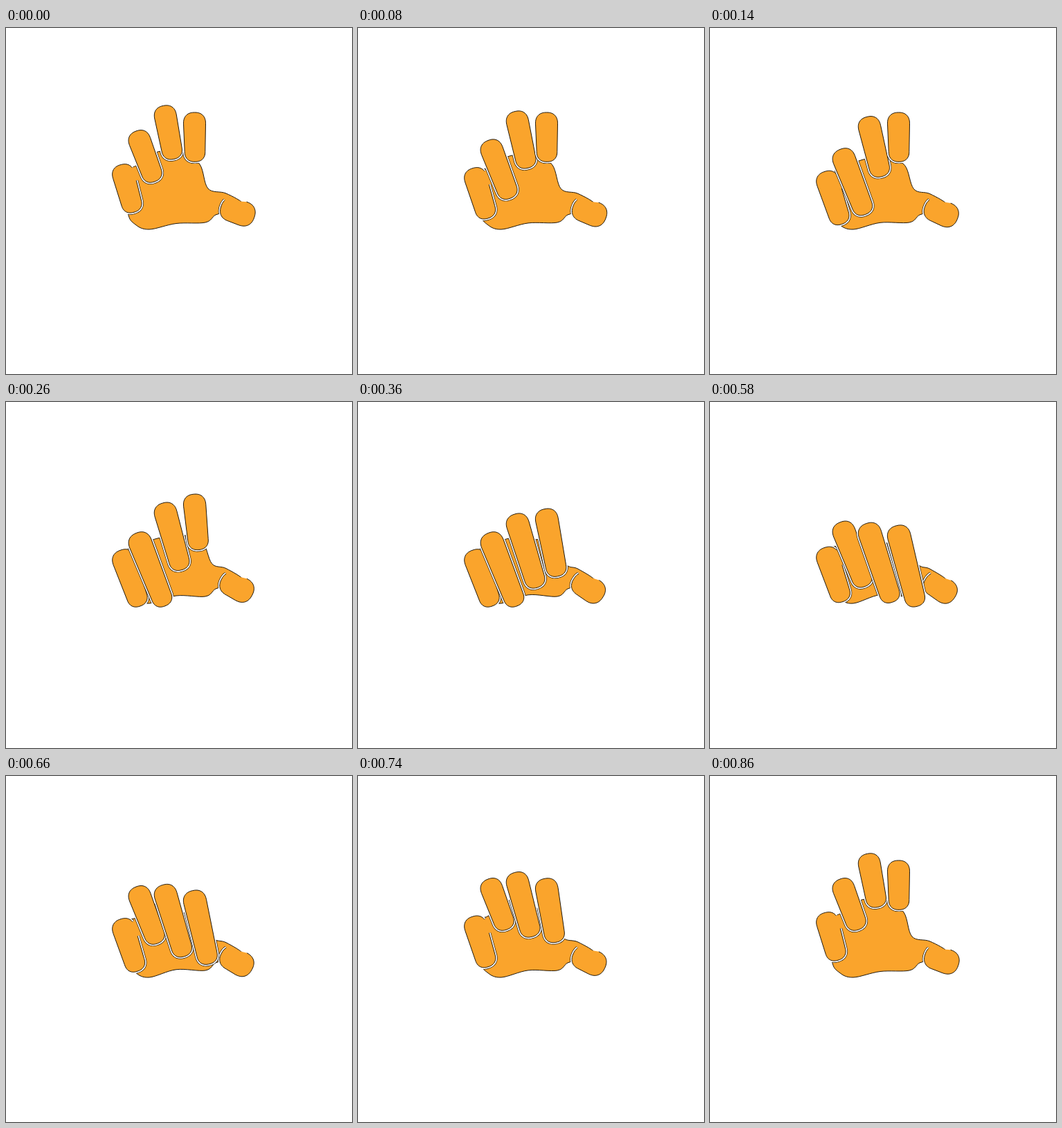
An HTML page with a canvas that plays this animation: 500 by 500 pixels, repeating every 0.88 s.

```html
<!DOCTYPE html>
<html lang="en">
<head>
<meta charset="utf-8">
<title>Drumming fingers</title>
<style>
  html, body { margin: 0; width: 100%; height: 100%; overflow: hidden; background: #fff; }
  canvas { display: block; width: 500px; height: 500px; }
</style>
</head>
<body>
<canvas id="stage" width="500" height="500"></canvas>
<script>
const ctx = document.getElementById('stage').getContext('2d');
const LOOP = 880, STEP = 20, OPEN_END = 860;
const ORANGE = '#faa42c', LINE = '#20180c';

const lerp = (a, b, p) => a + (b - a) * p;
const ramp = (t, from, to) => Math.min(1, Math.max(0, (t - from) / (to - from)));

// Curls in with a slight ease, then straightens at constant speed
const curl = (t, close, closeEnd, open, openEnd = OPEN_END) =>
  ramp(t, close, closeEnd) ** 1.2 - ramp(t, open, openEnd);

// Superelliptic half cap, a little squarer than a circle
function cap(path, x, y, r, axis, from, to) {
  const squash = v => Math.sign(v) * Math.abs(v) ** 0.85;
  const ca = Math.cos(axis), sa = Math.sin(axis), steps = 24;
  for (let i = 0; i <= steps; i++) {
    const a = lerp(from, to, i / steps);
    const u = r * squash(Math.cos(a)), v = r * squash(Math.sin(a));
    path.lineTo(x + u * ca - v * sa, y + u * sa + v * ca);
  }
}

// Tapered capsule; with a cut, one side stays open and blends into the palm
function digit(x0, y0, r0, x1, y1, r1, { start = 0, cut = 0 } = {}) {
  const path = new Path2D(), axis = Math.atan2(y1 - y0, x1 - x0), q = Math.PI / 2;
  const r = lerp(r0, r1, start);
  path.moveTo(lerp(x0, x1, start) + r * Math.sin(axis), lerp(y0, y1, start) - r * Math.cos(axis));
  cap(path, x1, y1, r1, axis, -q, q);
  cap(path, x0, y0, r0, axis, q, 3 * q - cut);
  if (!cut) path.closePath();
  return path;
}

// Closed Catmull-Rom curve
function blob(points) {
  const n = points.length, path = new Path2D(), at = i => points[(i + n) % n];
  path.moveTo(...at(0));
  for (let i = 0; i < n; i++) {
    const [a, b, c, d] = [at(i - 1), at(i), at(i + 1), at(i + 2)];
    path.bezierCurveTo(
      b[0] + (c[0] - a[0]) / 6, b[1] + (c[1] - a[1]) / 6,
      c[0] - (d[0] - b[0]) / 6, c[1] - (d[1] - b[1]) / 6, ...c);
  }
  return path;
}

function stroke(path, color, width) {
  ctx.strokeStyle = color;
  ctx.lineWidth = width;
  ctx.stroke(path);
}

// The white gap is cut only into what is already painted
function paint(path) {
  ctx.globalCompositeOperation = 'source-atop';
  stroke(path, LINE, 5.6);
  stroke(path, '#fff', 4.2);
  ctx.globalCompositeOperation = 'source-over';
  ctx.fillStyle = ORANGE;
  ctx.fill(path);
  stroke(path, LINE, 1);
}

function palm(pinky, ring, middle, thumb) {
  return blob([
    [176, 266], [187, 284], [207, 291], [246, 282.5 - 5 * thumb], [288, 281], [303, 270],
    [320, 266], [343, 255 + 5 * thumb], [318, 239 + 3 * thumb],
    [292 + 11 * thumb, 232 + 3 * thumb], [280 + 6 * thumb, 197 + 6 * thumb],
    [255, 180 + 25 * middle], [219, 179 + 18 * ring],
    [188, 199 + 10 * pinky], [174, 207 + 10 * pinky]
  ]);
}

// Closed fingertips line up in an evenly spaced row
function finger(slot, p, topX, topY, topDrop, tipX, tipY, blend) {
  return digit(topX + p, topY + topDrop * p, 16 + 0.8 * p,
    lerp(tipX, 189 + 35.5 * slot, p), lerp(tipY, 281, p), 14.8, blend);
}

function draw(t) {
  const pinky = curl(t, 0, 214, 500), ring = curl(t, 0, 200, 488, 725);
  const middle = curl(t, 0, 460, 564), index = curl(t, 190, 460, 600);
  const thumb = curl(t, 0, 460, 500);

  ctx.clearRect(0, 0, 500, 500);
  ctx.lineJoin = 'round';
  paint(palm(pinky, ring, middle, thumb));
  paint(digit(327 - thumb, 263 + 2 * thumb, 17, 342 - 4 * thumb, 268 + 6 * thumb, 17.7,
    { start: 1, cut: 1 }));
  paint(finger(0, pinky, 170, 213, 17, 181, 252, { start: 0.3, cut: 0.4 }));
  paint(finger(1, ring, 193.5, 164, 41, 210, 208));
  paint(finger(2, middle, 230.5, 128, 67, 239.5, 175));
  paint(finger(3, index, 272.5, 138, 57, 273, 178.5));
}

const start = performance.now();
function tick() {
  const t = (performance.now() - start) % LOOP;
  draw(Math.floor(t / STEP) * STEP);
  requestAnimationFrame(tick);
}
tick();
</script>
</body>
</html>
```
